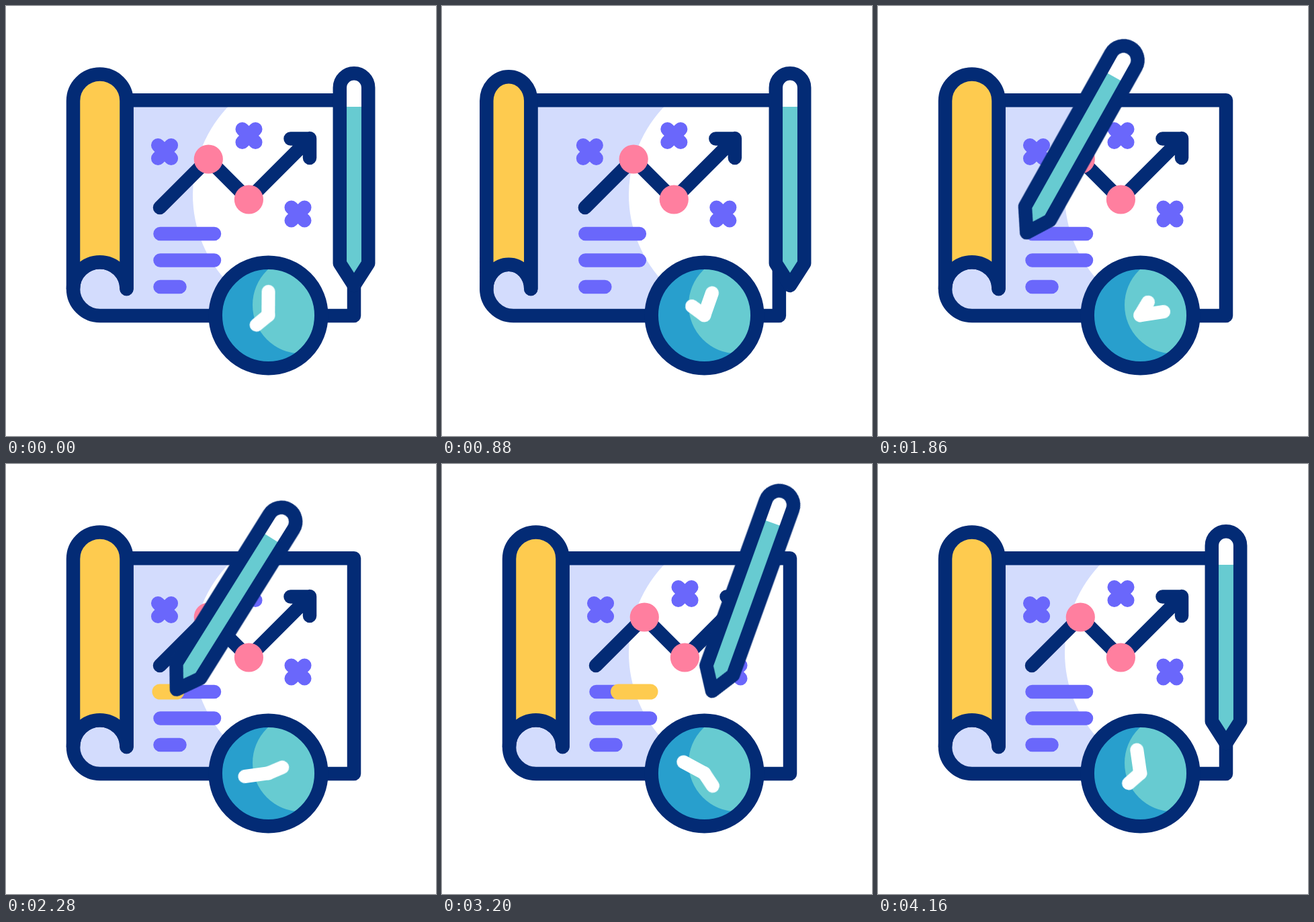
Recreate the animation shown at these times as an HTML page. Size 640x640 px, loop 4180 ms.

```html
<!DOCTYPE html>
<html lang="en">
<head>
<meta charset="utf-8">
<title>Plan scroll</title>
<style>
  html, body { margin: 0; width: 100%; height: 100%; overflow: hidden; background: #fff; }
  svg { display: block; width: 100vw; height: 100vh; }
  .ink { fill: none; stroke: #032b75; stroke-width: 20.5; stroke-linecap: round; stroke-linejoin: round; }
  .mark { fill: none; stroke: #6a67fb; stroke-width: 20.5; stroke-linecap: round; }
  .hand { stroke: #fff; stroke-width: 20; stroke-linecap: round; animation: turn 4180ms linear infinite; }
  .minute { animation-duration: 836ms; }
  @keyframes turn { to { transform: rotate(360deg); } }
</style>
</head>
<body>
<svg viewBox="0 0 640 640">
  <defs>
    <clipPath id="face"><circle cx="390.5" cy="460.5" r="75"/></clipPath>
    <path id="cross" d="M-9.8-9.8 9.8 9.8M-9.8 9.8 9.8-9.8"/>
  </defs>

  <path id="paper" fill="#d3dcfd"/>
  <circle cx="468" cy="281" r="190" fill="#fff"/>
  <path id="edge" class="ink"/>

  <g id="chart">
    <g class="mark">
      <use href="#cross" x="236" y="217"/>
      <use href="#cross" x="361.5" y="193"/>
      <use href="#cross" x="434.5" y="309.5"/>
      <path d="M229.5 339H310M229.5 378.5H310M229.5 418H258.5"/>
    </g>
    <path id="glow" fill="none" stroke="#fecb4f" stroke-width="23" stroke-linecap="round"/>
    <path class="ink" d="M229 300 301 228 361 288 452 197M423.5 197.5H452V226"/>
    <g fill="#ff7f9f">
      <circle cx="301.3" cy="228" r="21.6"/>
      <circle cx="361.4" cy="288" r="21.6"/>
    </g>
  </g>

  <path id="roll" class="ink" style="fill:#fecb4f"/>

  <circle cx="390.5" cy="460.5" r="78.8" fill="#289fcd"/>
  <circle cx="439.5" cy="445" r="72.5" fill="#67cbd1" clip-path="url(#face)"/>
  <circle class="ink" cx="390.5" cy="460.5" r="78.8"/>
  <g transform="translate(390.3 460.3)">
    <path class="hand minute" d="M0 0V-35.3"/>
    <path class="hand" d="M0 0-17.6 14.4"/>
  </g>

  <g id="pen">
    <path d="M-21-147.5A21 21 0 0 1 21-147.5V-110H-21Z" fill="#fff"/>
    <path d="M-21-119H21V114L0 147-21 114Z" fill="#67cbd1"/>
    <path class="ink" d="M-21.2-147.5A21.2 21.2 0 0 1 21.2-147.5V114L0 147-21.2 114Z"/>
  </g>
</svg>
<script>
  const LOOP = 4180;
  const el = id => document.getElementById(id);
  const mix = (a, b, u) => a + (b - a) * u;
  const span = (t, from, to) => Math.min(1, Math.max(0, (t - from) / (to - from)));
  const soft = u => u * u * (3 - 2 * u);
  const softer = u => u ** 3 * (u * (6 * u - 15) + 10);

  // The sheet sways right, then left; the roll swings past its rest before settling.
  const BEATS = [0, 420, 700, 1340, 1640];
  const sway = (t, amounts) => BEATS.slice(1).reduce(
    (x, beat, i) => mix(x, amounts[i + 1], soft(span(t, BEATS[i], beat))), amounts[0]);

  function drawPaper(t) {
    const swing = sway(t, [0, 26, -45, 13.5, 0]);
    const shift = sway(t, [0, 20, -20, 0, 0]);
    const l = 100 + swing, r = l + 79.5 + 0.4 * Math.min(swing, 0);
    const rx = (r - l) / 2, ry = 40 - (40 - rx) * 0.55;
    const arc = `A${rx} ${ry} 0 0`;
    const sheet = `M${r} 140.3H${518 + shift}V461H${l + 40}A40 40 0 0 1 ${l} 421${arc} 1 ${r} 421Z`;
    el('paper').setAttribute('d', sheet);
    el('edge').setAttribute('d', sheet);
    el('roll').setAttribute('d', `M${l} 421V141.3${arc} 1 ${r} 141.3V421${arc} 0 ${l} 421Z`);
    el('chart').setAttribute('transform', `translate(${shift})`);
  }

  const REST = { x: 518, y: 269, tilt: 0 };
  const LINE_START = { x: 292, y: 211, tilt: 32 };
  const LINE_END = { x: 393, y: 211, tilt: 32 };

  // Flies in an arc that rises early; bulge bows the path sideways.
  function fly(a, b, u, bulge) {
    const s = 1 - (1 - u) ** 1.5;
    return {
      x: mix(a.x, b.x, softer(u)) + bulge * Math.sin(Math.PI * u),
      y: mix(a.y, b.y, s) - 41 * Math.sin(Math.PI * s),
      tilt: mix(a.tilt, b.tilt, u)
    };
  }

  function penAt(t) {
    if (t < 1930) return fly(REST, LINE_START, span(t, 1100, 1930), 0);
    if (t < 2880) return { ...LINE_START, x: mix(LINE_START.x, LINE_END.x, softer(span(t, 1930, 2720))) };
    return fly(LINE_END, REST, span(t, 2880, 3720), 25);
  }

  function drawPen(t) {
    const { x, y, tilt } = penAt(t);
    el('pen').setAttribute('transform', `translate(${x} ${y}) rotate(${tilt})`);
    const tip = x - 147 * Math.sin(tilt * Math.PI / 180);
    const from = mix(229, 311, soft(span(t, 2840, 3660))), to = Math.min(tip, 310);
    el('glow').setAttribute('d', t > 1930 && to > from ? `M${from} 339H${to}` : '');
  }

  let start;
  function frame(now) {
    start ??= now;
    const t = (now - start) % LOOP;
    drawPaper(t);
    drawPen(t);
    requestAnimationFrame(frame);
  }
  requestAnimationFrame(frame);
</script>
</body>
</html>
```
